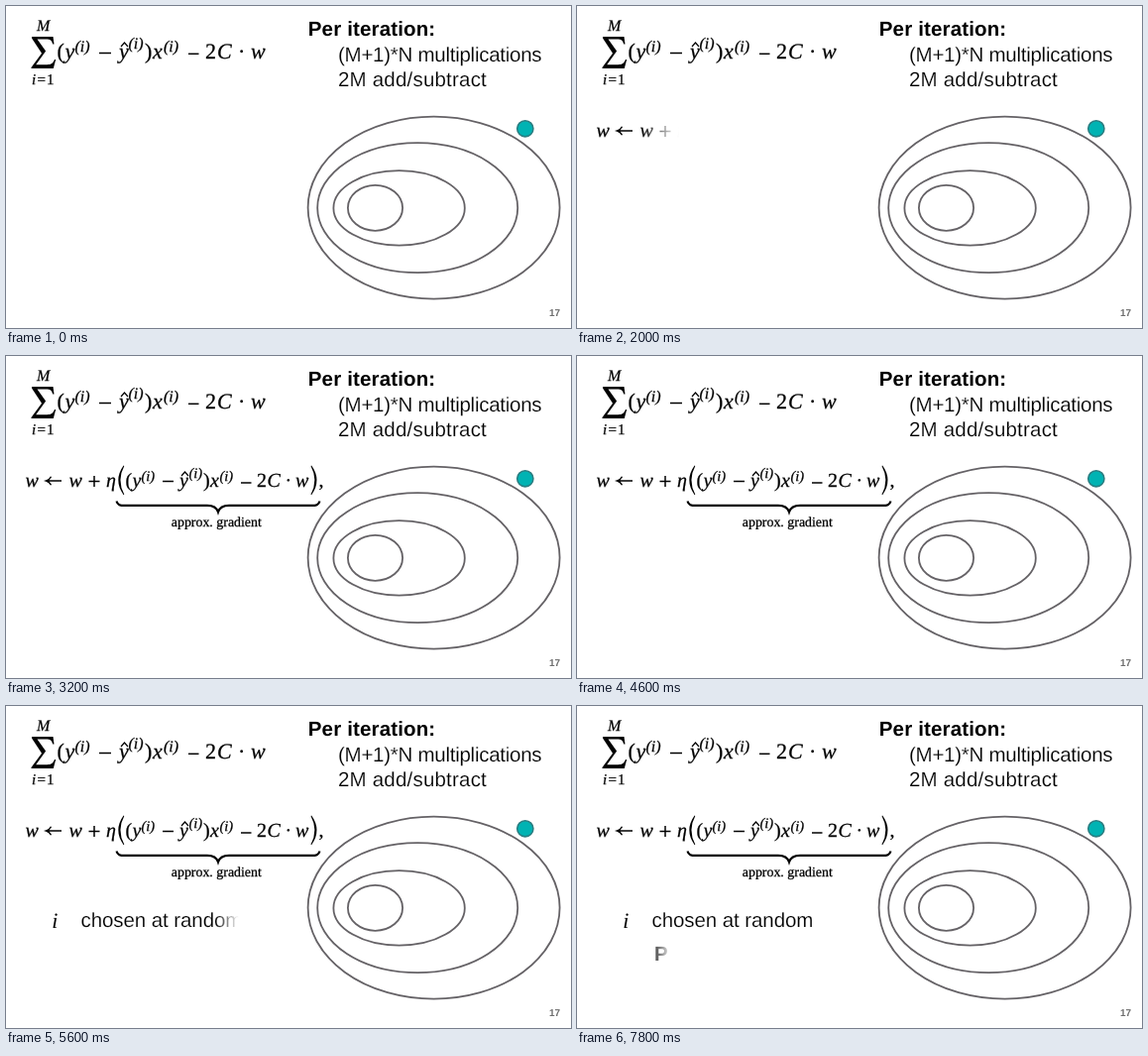
An HTML page that plays this animation: 570 by 325 pixels, repeating every 8000 ms.

```html
<!DOCTYPE html>
<html lang="en">
<head>
<meta charset="utf-8">
<title>Per iteration</title>
<style>
  html, body { margin: 0; width: 100%; height: 100%; overflow: hidden; background: #fff; }
  svg { display: block; width: 570px; height: 325px; }
  text { text-rendering: geometricPrecision; }
  .math { font-family: "Liberation Serif", serif; }
  .math text { stroke: #000; stroke-width: .25px; }
  .it { font-style: italic; }
  .sans { font-family: "Liberation Sans", sans-serif; font-size: 20.5px; }
  .light { stroke: #fff; stroke-width: .2px; }
  .bold { font-weight: 700; }
  .rings { fill: none; stroke: #656266; stroke-width: 1.8; }
</style>
</head>
<body>
<svg id="stage" viewBox="0 0 570 325">
  <defs id="defs"></defs>
  <rect width="570" height="325" fill="#fff"/>
  <g class="rings">
    <ellipse cx="431.6" cy="203.6" rx="127" ry="92"/>
    <ellipse cx="415.2" cy="203.7" rx="101" ry="65.5"/>
    <ellipse cx="396.6" cy="203.9" rx="66.2" ry="37.7"/>
    <ellipse cx="372.5" cy="203.8" rx="27.6" ry="23"/>
  </g>
  <circle cx="523.8" cy="123.8" r="8.1" fill="#00b3b3" stroke="#2b7d80" stroke-width="1.6"/>
  <text class="sans bold" x="304.8" y="30" letter-spacing=".15">Per iteration:</text>
  <text class="sans light" x="335" y="55.5" letter-spacing="-.26">(M+1)*N multiplications</text>
  <text class="sans light" x="335" y="81" letter-spacing=".2">2M add/subtract</text>
  <text class="sans bold" x="548" y="313" style="font-size:10px" fill="#6e6e6e">17</text>
  <g id="sum" class="math">
    <path d="M26 31H47.5L48.5 38.5H47.2C46.3 34.6 44.5 33.4 40.5 33.4H31.5L40.1 45.6L30.2 59.2H41.5C45.5 59.2 47.6 57.6 49 54H50.2L47.8 63H25.5V62L36 47.8L26 32.6Z"/>
  </g>
  <g id="update" class="math">
    <path d="M56 126H41M45.5 121.8Q44 125 40.5 126Q44 127 45.5 130.2" fill="none" stroke="#000" stroke-width="1.4"/>
    <path d="M118.6 110.5Q108 125.3 118.6 140.2L119.3 139.7Q111.5 125.3 119.3 111Z"/>
    <path d="M308.2 110.5Q318.8 125.3 308.2 140.2L307.5 139.7Q315.3 125.3 307.5 111Z"/>
    <path d="M111.5 146.5C112.5 150.4 115 150.9 120 150.9H203C209 150.9 212.5 153 214 157.5C215.5 153 219 150.9 225 150.9H308C313 150.9 315.5 150.4 316.5 146.5" fill="none" stroke="#000" stroke-width="2.2"/>
  </g>
  <g id="chosen">
    <text class="math it" x="46.2" y="223.5" font-size="22">i</text>
    <text class="sans light" x="75.5" y="223" letter-spacing="-.08">chosen at random</text>
  </g>
  <g id="next">
    <text class="sans bold" x="78" y="257">P</text>
  </g>
</svg>
<script>
const NS = "http://www.w3.org/2000/svg";
const LOOP = 8000, STEP = 200;
const $ = id => document.getElementById(id);

function add(parent, tag, attrs, text) {
  const el = document.createElementNS(NS, tag);
  for (const k in attrs) el.setAttribute(k, attrs[k]);
  if (text) el.textContent = text;
  return parent.appendChild(el);
}

function glyphs(group, y, size, italic, items) {
  for (const [text, x] of items)
    add(group, "text", { x, y, "font-size": size, class: italic ? "it" : "" }, text);
}

function bar(group, x1, x2, y) {
  add(group, "path", { d: `M${x1} ${y}H${x2}`, stroke: "#000", "stroke-width": 1.5 });
}

function superscripts(group, size, places) {
  for (const [x, y] of places) glyphs(group, y, size, true, [["(i)", x]]);
}

function hat(group, x, y) {
  add(group, "path", { d: `M${x - 3.5} ${y + 4}L${x} ${y}L${x + 3.5} ${y + 4}`,
    fill: "none", stroke: "#000", "stroke-width": 1.2 });
}

const sum = $("sum");
glyphs(sum, 24.5, 16, true, [["M", 31]]);
glyphs(sum, 78.5, 15, true, [["i", 26]]);
glyphs(sum, 78.5, 15, false, [["=", 31.5], ["1", 41]]);
glyphs(sum, 52.5, 22, false, [["(", 51.5], [")", 140], ["2", 201], ["·", 234]]);
glyphs(sum, 52.5, 22, true, [["y", 59.5], ["y", 114], ["x", 148], ["C", 213], ["w", 247]]);
superscripts(sum, 16, [[69.5, 45.5], [123.5, 43], [159, 45.5]]);
bar(sum, 94, 106, 47.5);
bar(sum, 184, 194.5, 48.3);
hat(sum, 119.5, 37);

const update = $("update");
glyphs(update, 132, 20, true, [["w", 19.5], ["w", 63.5], ["η", 101],
  ["y", 127.5], ["y", 175], ["x", 206], ["C", 263.5], ["w", 292]]);
glyphs(update, 132, 20, false, [["(", 120.5], [")", 199], ["2", 253], ["·", 281.5], [",", 315.5]]);
superscripts(update, 14.5, [[136.5, 125.5], [184.5, 122.5], [215.5, 125.5]]);
bar(update, 83.5, 94.5, 126.5);
add(update, "path", { d: "M89 121V132", stroke: "#000", "stroke-width": 1.5 });
bar(update, 158, 169, 126.5);
bar(update, 237, 247.5, 128);
hat(update, 180.5, 117);
glyphs(update, 172, 13.9, false, [["approx. gradient", 166.8]]);

// Soft-edged wipes from left to right; speed in px per ms.
const wipes = [
  { id: "update", start: 1775, from: 19, speed: .373, soft: 38 },
  { id: "chosen", start: 4750, from: 46, speed: .222, soft: 24 },
  { id: "next", start: 7720, from: 78, speed: .222, soft: 24 }
];

for (const w of wipes) {
  const grad = add($("defs"), "linearGradient",
    { id: w.id + "Fade", gradientUnits: "userSpaceOnUse", y1: 0, y2: 0 });
  add(grad, "stop", { offset: 0, "stop-color": "#fff" });
  add(grad, "stop", { offset: 1, "stop-color": "#000" });
  const mask = add($("defs"), "mask",
    { id: w.id + "Mask", maskUnits: "userSpaceOnUse", x: 0, y: 0, width: 570, height: 325 });
  add(mask, "rect", { width: 570, height: 325, fill: `url(#${w.id}Fade)` });
  $(w.id).setAttribute("mask", `url(#${w.id}Mask)`);
  w.grad = grad;
}

function draw(time) {
  const t = Math.floor((time % LOOP) / STEP) * STEP;
  for (const w of wipes) {
    const edge = w.from + (t - w.start) * w.speed;
    w.grad.setAttribute("x1", edge - w.soft);
    w.grad.setAttribute("x2", edge);
    $(w.id).style.display = t < w.start ? "none" : "";
  }
}

const begin = performance.now();
function tick() {
  draw(performance.now() - begin);
  requestAnimationFrame(tick);
}
tick();
</script>
</body>
</html>
```
